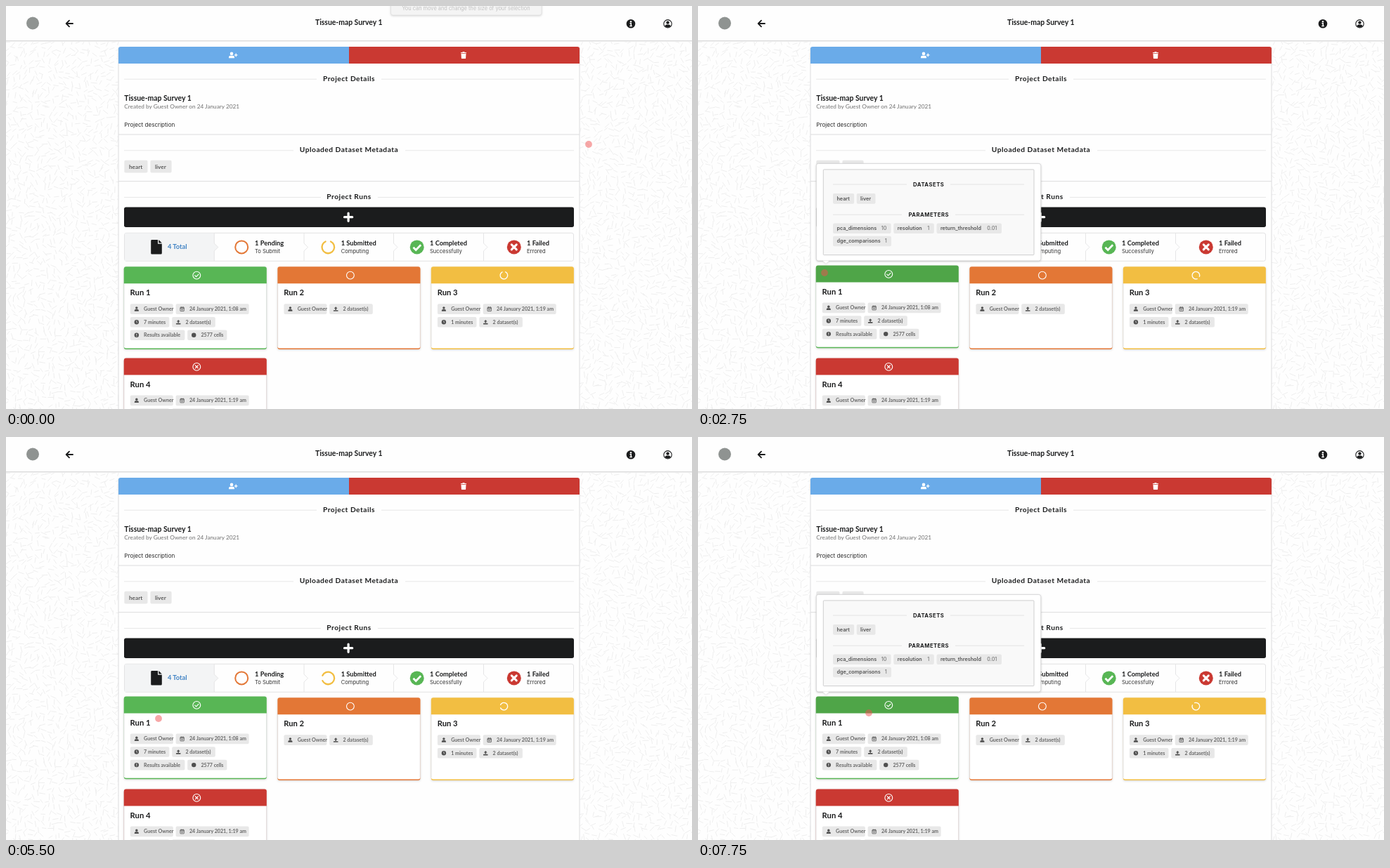
An HTML page for the animation above (8 s loop, 976 by 574 pixels).

```html
<!DOCTYPE html>
<html lang="en">
<head>
<meta charset="utf-8">
<title>Project runs</title>
<style>
html, body { margin: 0; width: 100%; height: 100%; overflow: hidden; background: #fefefe; }
svg { display: block; }
text { font-family: Lato, sans-serif; white-space: pre; }
.ui { font-family: Inter, sans-serif; }
.soft { filter: drop-shadow(0 1px 1.5px rgba(0, 0, 0, .16)); }
</style>
</head>
<body>
<svg id="stage" width="976" height="574" viewBox="0 0 976 574"></svg>
<script>
const GREEN = '#58b655', GREEN_HOVER = '#4fa548', ORANGE = '#e37736', YELLOW = '#f2be42',
  RED = '#ca3932', BLUE = '#6aabe9', INK = '#1b1c1d', LINE = '#dcdcdd';
const PROJECT = 'Tissue-map Survey 1', OWNER = 'Guest Owner';

const rect = (x, y, w, h, fill, r = 0, more = '') =>
  `<rect x="${x}" y="${y}" width="${w}" height="${h}" rx="${r}" fill="${fill}" ${more}/>`;
const circle = (x, y, r, fill, more = '') => `<circle cx="${x}" cy="${y}" r="${r}" fill="${fill}" ${more}/>`;
const ring = (x, y, r, color, w, more = '') => circle(x, y, r, 'none', `stroke="${color}" stroke-width="${w}" ${more}`);
const shape = (d, fill, more = '') => `<path d="${d}" fill="${fill}" ${more}/>`;
const line = (d, color = LINE, w = 1, more = '') =>
  shape(d, 'none', `stroke="${color}" stroke-width="${w}" ${more}`);
const text = (x, y, s, size, fill = INK, weight = 700, more = '') =>
  `<text x="${x}" y="${y}" font-size="${size}" font-weight="${weight}" fill="${fill}" ${more}>${s}</text>`;
const at = (x, y, body) => `<g transform="translate(${x} ${y})">${body}</g>`;
const MIDDLE = 'text-anchor="middle"', UI = 'class="ui"';
const ROUND = 'stroke-linecap="round" stroke-linejoin="round"';

const notch = (x, y, r, color, w) =>
  `<g class="spin" data-x="${x}" data-y="${y}">` +
  ring(x, y, r, color, w, 'pathLength="360" stroke-dasharray="310 50" stroke-linecap="round"') + '</g>';

const icons = {
  user: circle(0, -1.6, 1.7, '#505050') + shape('M-3 3.2V2Q-3 .3-1.3 .3H1.3Q3 .3 3 2V3.2Z', '#505050'),
  date: rect(-2.7, -2.4, 5.4, 5.4, 'none', .5, 'stroke="#505050" stroke-width=".8"') +
    line('M-2.7-1H2.7M-1.3-3.4V-2M1.3-3.4V-2M-1.6 1H1.6', '#505050', .9),
  clock: circle(0, 0, 3.2, '#505050') + line('M0-1.9V.2L1.2 1', '#e8e8e8', .8),
  upload: shape('M0-3.3L2.4-.6H.8V1.3H-.8V-.6H-2.4Z', '#505050') + rect(-3.3, 1.6, 6.6, 1.6, '#505050', .4),
  alert: circle(0, 0, 3.2, '#505050') + line('M0-1.9V.4M0 1.1V2', '#e8e8e8', 1),
  cells: circle(0, 0, 3.2, '#505050')
};

function tag(x, y, w, icon, label) {
  return rect(x, y - 7.3, w, 14.6, '#e8e8e8', 2) + at(x + 9, y, icons[icon]) +
    text(x + 19.3, y + 2.5, label, 7.1, '#666');
}

// Card contents are laid out from the card's top left corner.
function card(x, y, color, mark, title, rows, more = '') {
  const tags = rows.map((row, i) => {
    let left = 9;
    return row.map(([w, icon, label]) => {
      const out = tag(left, 60.4 + i * 18.6, w, icon, label);
      left += w + 3.8;
      return out;
    }).join('');
  }).join('');
  return at(x, y, `<g ${more}><g class="soft">` +
    rect(0, 1, 203, 116.8, color, 3) + rect(0, 0, 203, 116.2, '#fff', 3) + '</g>' +
    line('M.2 22V114M202.8 22V114', LINE, .7) +
    shape('M0 24V3Q0 0 3 0H200Q203 0 203 3V24Z', color, 'class="head"') +
    mark + text(8.8, 41.2, title, 11.2) + tags + '</g>');
}

function heading(y, label, left, right) {
  return line(`M168 ${y + .5}H${left - 8}M${right + 9} ${y + .5}H808`, '#e2e2e3', .8) +
    text(488, y + 3, label, 10.2, INK, 700, MIDDLE + ' letter-spacing=".51"');
}

function step(x, title, sub) {
  return text(x, 341, title, 9.3) + text(x, 351.8, sub, 7.6, '#333', 400, UI);
}

function backdrop() {
  let seed = 7, d = '';
  const rnd = () => (seed = seed * 16807 % 2147483647) / 2147483647;
  for (const start of [0, 817])
    for (let y = 50; y < 580; y += 8.3)
      for (let x = start; x < start + 162; x += 8.3) {
        const a = rnd() * Math.PI, l = 3 + rnd() * 1.6;
        const cx = x + rnd() * 6, cy = y + rnd() * 6, dx = Math.cos(a) * l, dy = Math.sin(a) * l;
        d += `M${(cx - dx).toFixed(1)} ${(cy - dy).toFixed(1)}l${(2 * dx).toFixed(1)} ${(2 * dy).toFixed(1)}`;
      }
  return line(d, '#ececec', .9);
}

function topBar() {
  return rect(0, 0, 976, 49.5, '#fefefe') + rect(0, 49, 976, 1, '#d9d9da') + rect(0, 50, 976, 1, '#f1f1f1') +
    circle(38, 24.5, 9, '#8f9391') +
    line('M95 25H86M90 20.7L85.7 25L90 29.3', INK, 1.9, ROUND) +
    text(487.7, 27.3, PROJECT, 10.4, INK, 700, MIDDLE) +
    circle(889, 25.3, 6.3, INK) + circle(889, 22.3, 1.2, '#fff') +
    line('M887.5 24.7H889.3V28.5M887.3 28.5H890.8', '#fff', 1.4) +
    ring(941.5, 25.3, 5.7, INK, 1.1) + circle(941.5, 23.6, 2.2, INK) +
    shape('M937.4 28.8Q938 26.6 940 26.6H943Q945 26.6 945.6 28.8Q944 30.8 941.5 30.8T937.4 28.8Z', INK) +
    '<g id="toast" class="soft">' + rect(547.5, -8, 214.5, 21, '#f4f4f4', 3, 'stroke="#dadada" stroke-width=".6"') +
    text(654.5, 6.2, 'You can move and change the size of your selection', 7.4, '#c2c2c2', 400, MIDDLE + ' ' + UI) + '</g>';
}

function details() {
  const person = circle(-2, -2.3, 2.3, '#fff') + shape('M-6 4V2.7Q-6 .6-4 .6H0Q2 .6 2 2.7V4Z', '#fff') +
    line('M4.2-2.6V2M1.9-.3H6.5', '#fff', 1.3);
  const bin = rect(-4, -4.3, 8, 1.4, '#fff', .3) + rect(-1.5, -5, 3, 1, '#fff') +
    shape('M-3.5-2.2H3.5L3.1 4Q3 4.9 2.2 4.9H-2.2Q-3 4.9-3.1 4Z', '#fff');
  return rect(160, 60, 656, 530, '#fefefe', 0, `stroke="${LINE}"`) +
    shape('M160 82V61Q160 58 163 58H488V82Z', BLUE) + shape('M488 58H813Q816 58 816 61V82H488Z', RED) +
    at(323, 70.2, person) + at(651, 70.2, bin) +
    heading(103.7, 'Project Details', 450, 525) +
    text(168.3, 135, PROJECT, 10.4) +
    text(168.3, 145.5, `Created by ${OWNER} on 24 January 2021`, 8.25, '#707070', 400) +
    text(168.3, 172.2, 'Project description', 8.1, '#2a2a2a', 400, UI) +
    line('M160 183H816M160 249.7H816') +
    heading(205.3, 'Uploaded Dataset Metadata', 417, 559) +
    rect(168.3, 219.8, 33.2, 17.6, '#e8e8e8', 2) + text(175, 231.5, 'heart', 8.2, '#5c5c5c') +
    rect(205.4, 219.8, 30.2, 17.6, '#e8e8e8', 2) + text(212, 231.5, 'liver', 8.2, '#5c5c5c') +
    heading(272, 'Project Runs', 456, 520);
}

function summary() {
  const dividers = [424, 551.5, 679.5].map(x =>
    line(`M${x} 323.5V338L${x + 5.5} 343.5L${x} 349V363`, '#e0e0e1', .8)).join('');
  return rect(168, 286.5, 640, 28.5, INK, 2.7) +
    line('M481.5 300.7H492.7M487.1 295.1V306.3', '#fff', 3.2, 'stroke-linecap="round"') +
    rect(168.5, 323.3, 639, 40, '#fefefe', 2.7, `stroke="${LINE}" stroke-width=".8"`) +
    shape('M169 323.7H296.3V338L301.8 343.5L296.3 349V363H169Z', '#f3f4f5') +
    line('M296.3 323.5V338L301.8 343.5L296.3 349V363', '#e0e0e1', .8) + dividers +
    shape('M207.5 333H216V338.7H221.8V352Q221.8 353.6 220.3 353.6H207.5Q206.2 353.6 206.2 352.2V334.4Q206.2 333 207.5 333ZM217.2 333L221.8 337.5H217.2Z', INK) +
    text(230, 346.4, '4 Total', 9.3, '#4183c4') +
    ring(335.2, 343.4, 9, ORANGE, 2) + step(354, '1 Pending', 'To Submit') +
    notch(458.3, 343.4, 8.8, YELLOW, 2.3) + step(476.7, '1 Submitted', 'Computing') +
    circle(584.7, 343.4, 10, GREEN) + line('M579.5 343.8L583.2 347.5L590.2 340.2', '#fff', 2.7) +
    step(603, '1 Completed', 'Successfully') +
    circle(722.8, 343.4, 10, RED) + line('M719.3 339.9L726.3 346.9M726.3 339.9L719.3 346.9', '#fff', 3, ROUND) +
    step(741, '1 Failed', 'Errored');
}

function cards() {
  const user = [61, 'user', OWNER], sets = [61.6, 'upload', '2 dataset(s)'];
  const date = time => [104, 'date', `24 January 2021, ${time} am`];
  const spent = n => [55.6, 'clock', n + ' minutes'];
  const results = [[77.6, 'alert', 'Results available'], [56.2, 'cells', '2577 cells']];
  const hoop = ring(103.5, 12.4, 5.4, '#fff', 1.1);
  const cross = line('M101.6 10.5L105.4 14.3M105.4 10.5L101.6 14.3', '#fff', 1.2, ROUND);
  const check = line('M100.9 12.6L102.8 14.4L106.2 10.9', '#fff', 1.2, ROUND);
  return card(386.4, 371.2, ORANGE, hoop, 'Run 2', [[user, sets]]) +
    card(604.9, 371.2, YELLOW, notch(103.5, 12.4, 5.3, '#fff', 1.3), 'Run 3', [[user, date('1:19')], [spent(1), sets]]) +
    card(167.8, 501.5, RED, hoop + cross, 'Run 4', [[user, date('1:19')], [spent(6), sets]]) +
    card(167.8, 371.2, GREEN, hoop + check, 'Run 1', [[user, date('1:08')], [spent(7), sets], results], 'id="run"');
}

function popup() {
  const title = (y, s, left, right) =>
    line(`M192 ${y}H${left - 8}M${right + 8} ${y}H464`, '#dedede', .8) +
    text(328.2, y + 2.9, s, 7.7, INK, 700, `${MIDDLE} ${UI} letter-spacing=".5"`);
  const chip = (x, y, w, name, value = '', valueX = 0) => rect(x, y - 7.3, w, 14.6, '#e8e8e8', 2) +
    text(x + 5.4, y + 2.5, name, 7.25, '#555', 600, UI) + text(valueX, y + 2.5, value, 7.2, '#777', 500, UI);
  return '<g id="popup"><g class="soft">' +
    rect(168.3, 225, 319.5, 138.5, '#fff', 3, 'stroke="#d0d0d1" stroke-width=".8"') +
    shape('M177.5 363.3L182 367.3L186.5 363.3Z', '#fff') + '</g>' +
    rect(178.3, 233.5, 299.7, 121.7, '#f9f9f9', 1, 'stroke="#c9c9ca" stroke-width=".9"') +
    title(254.7, 'DATASETS', 305, 351) + chip(192, 275, 30.2, 'heart') + chip(225.7, 275, 26.8, 'liver') +
    title(297.8, 'PARAMETERS', 298, 358) +
    chip(192, 317.3, 82.6, 'pca_dimensions', '10', 260.7) + chip(278.3, 317.3, 57.5, 'resolution', '1', 326.3) +
    chip(339.5, 317.3, 92.5, 'return_threshold', '0.01', 411.3) +
    chip(192, 335.6, 83, 'dge_comparisons', '1', 265.7) + '</g>';
}

const $ = id => document.getElementById(id);
$('stage').innerHTML = backdrop() + details() + summary() + cards() + topBar() + popup() +
  '<circle id="pointer"/>';

const run = $('run'), head = run.querySelector('.head'), panel = $('popup'), toast = $('toast'), pointer = $('pointer');
const spinners = document.querySelectorAll('.spin');

// Pointer stops: time, x, y
const stops = [[0, 829, 197], [250, 829, 197], [500, 750, 199], [750, 430, 206], [1000, 170, 212], [1250, 114, 213],
  [1500, 111, 213], [2250, 111, 213], [2500, 142, 300], [2750, 180, 380], [3000, 187, 386], [3750, 212, 389],
  [4500, 223, 391], [5000, 217, 401], [6750, 217, 401], [7500, 236, 415], [7750, 243, 393]];

function pointerAt(t) {
  const i = stops.findIndex(s => s[0] >= t);
  if (i < 1) return stops[0].slice(1);
  const [t0, x0, y0] = stops[i - 1], [t1, x1, y1] = stops[i], k = (t - t0) / (t1 - t0);
  return [x0 + (x1 - x0) * k, y0 + (y1 - y0) * k];
}

function draw(now) {
  const t = Math.floor(now % 8000 / 250) * 250; // the screen refreshes four times a second
  const open = t >= 2750 && t < 5000 || t >= 7750;
  const opening = t === 2750 || t === 7750;
  const idle = t >= 1750 && t < 2500;
  const [x, y] = pointerAt(t);

  toast.style.display = t < 250 ? '' : 'none';
  run.setAttribute('transform', `translate(0 ${t >= 2750 ? -1.7 : 0})`);
  head.setAttribute('fill', open ? GREEN_HOVER : GREEN);
  panel.style.display = open ? '' : 'none';
  panel.setAttribute('transform', `translate(0 ${opening ? -.6 : 0})`);

  pointer.setAttribute('cx', x);
  pointer.setAttribute('cy', y);
  pointer.setAttribute('r', idle ? 5.5 : 4.9);
  pointer.setAttribute('fill', idle ? 'none' : 'rgba(240,80,80,.5)');
  pointer.setAttribute('stroke', idle ? 'rgba(240,80,80,.18)' : 'none');

  for (const s of spinners)
    s.setAttribute('transform', `rotate(${t * .18 - 65} ${s.dataset.x} ${s.dataset.y})`);
  requestAnimationFrame(() => draw(performance.now()));
}
draw(0);
</script>
</body>
</html>
```
